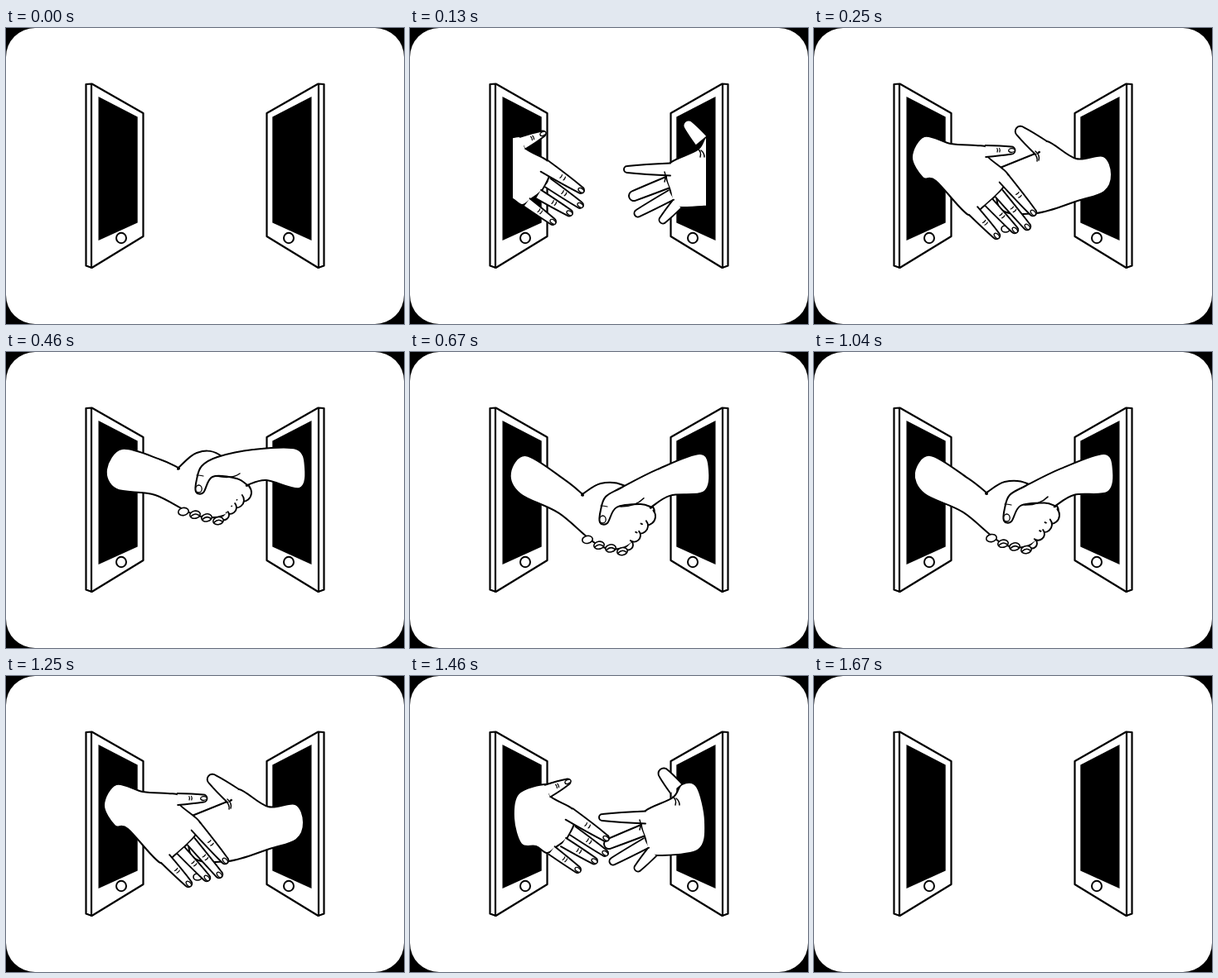
Write an HTML page with a canvas that moves like this. It is 480 px wide and 358 px high and loops after 1790 ms.

```html
<!DOCTYPE html>
<html lang="en">
<head>
<meta charset="utf-8">
<title>Handshake</title>
<style>
html, body { margin: 0; width: 100%; height: 100%; overflow: hidden; background: #000; }
canvas { display: block; width: 480px; height: 358px; }
</style>
</head>
<body>
<canvas id="stage" width="480" height="358"></canvas>
<script>
const ctx = document.getElementById('stage').getContext('2d');
const LOOP = 1790;
const still = (x, y) => [x, y];
const mix = (a, b, t) => a + (b - a) * t;
let warp = still;

function paint(width = 2) {
  ctx.lineWidth = width;
  ctx.fillStyle = '#fff';
  ctx.fill();
  ctx.stroke();
}

// Closed smooth curve through key points; a repeated point makes a corner.
function blob(...flat) {
  const n = flat.length / 2;
  const at = i => {
    const k = (i + n) % n * 2;
    return warp(flat[k], flat[k + 1]);
  };
  ctx.beginPath();
  ctx.moveTo(...at(0));
  for (let i = 0; i < n; i++) {
    const [a, b, c, d] = [at(i - 1), at(i), at(i + 1), at(i + 2)];
    ctx.bezierCurveTo(
      b[0] + (c[0] - a[0]) / 6, b[1] + (c[1] - a[1]) / 6,
      c[0] - (d[0] - b[0]) / 6, c[1] - (d[1] - b[1]) / 6, ...c);
  }
  paint();
}

function arc(x, y, rx, ry, turn = 0, from = 0, to = 7, width = 1.6) {
  ctx.beginPath();
  ctx.ellipse(...warp(x, y), rx, ry, turn, from, to);
  paint(width);
}

function stroke(x0, y0, cx, cy, x1, y1, width = 1.5) {
  ctx.lineWidth = width;
  ctx.beginPath();
  ctx.moveTo(...warp(x0, y0));
  ctx.quadraticCurveTo(...warp(cx, cy), ...warp(x1, y1));
  ctx.stroke();
}

// Tapered finger, open at its base so that it merges with the palm
function finger(x0, y0, x1, y1, r0, r1, nailed) {
  const a = Math.atan2(y1 - y0, x1 - x0), len = Math.hypot(x1 - x0, y1 - y0);
  ctx.save();
  ctx.translate(x0, y0);
  ctx.rotate(a);
  ctx.beginPath();
  ctx.moveTo(0, r0);
  ctx.quadraticCurveTo(len * .6, mix(r0, r1, .4), len, r1);
  ctx.arc(len, 0, r1, Math.PI / 2, -Math.PI / 2, true);
  ctx.quadraticCurveTo(len * .6, -mix(r0, r1, .4), 0, -r0);
  paint(1.9);
  if (nailed) {
    arc(len + .5, 0, 3.8, 2.3, 0, 0, 7, 1.3);
    for (const k of [.45, .54]) stroke(len * k, -3, len * k + 1, -1, len * k, 1.5, 1.2);
  }
  ctx.restore();
}

function polygon(...pts) {
  ctx.beginPath();
  pts.forEach(([x, y]) => ctx.lineTo(x, y));
  ctx.closePath();
}

function mirrored(draw) {
  draw();
  ctx.save();
  ctx.translate(480, 0);
  ctx.scale(-1, 1);
  draw();
  ctx.restore();
}

function phone() {
  polygon([96.5, 68], [103.5, 67.5], [165.5, 103], [165.5, 252], [103.5, 290], [96.5, 287.5]);
  paint(2.2);
  polygon([103, 68], [103, 290]);
  ctx.stroke();
  polygon([111.5, 83], [158.7, 107.5], [158.7, 235.5], [111.5, 257]);
  ctx.fillStyle = '#000';
  ctx.fill();
  arc(139, 254, 6, 6.2, 0, 0, 7, 2);
}

function openRight() {
  blob(346,134, 328,131, 317,147, 284,163, 279,180, 284,197, 288,212, 300,217, 348,210, 356,176);
  finger(321, 136, 306, 118, 9, 6.5);
  finger(284, 171, 232, 171, 7.5, 4);
  finger(280, 187, 240, 203, 7, 6);
  finger(285, 202, 245, 224, 6.5, 4.5);
  finger(292, 213, 275, 232, 7, 4.5);
  stroke(317, 146, 322, 150, 320, 156);
  stroke(321, 148, 325, 151, 325, 156);
  stroke(277, 174, 279, 179, 277, 186);
}

function openLeft() {
  blob(131,142, 165,131, 170,146, 195,160, 200,172, 190,195, 176,207, 165,214, 152,206, 134,203, 125,172);
  finger(166, 139, 190, 128, 8, 3.6, true);
  finger(192, 167, 236, 196, 8, 4, true);
  finger(196, 187, 235, 214, 6, 4, true);
  finger(185, 201, 222, 223.5, 6, 4, true);
  finger(171, 211, 202, 234, 6, 4, true);
}

// Hands drawn back by some pixels are cut off where they enter the screens.
function reach(back) {
  for (const [draw, dx, x] of [[openRight, back, 217], [openLeft, -back, 124]]) {
    ctx.save();
    if (back) {
      ctx.beginPath();
      ctx.roundRect(x, 100, 140, 160, 20);
      ctx.clip();
    }
    ctx.translate(dx, 0);
    draw();
    ctx.restore();
  }
}

function meet() {
  blob(349,155, 316,158, 281,137, 269,151, 269,151, 222,170, 222,170,
    224,218, 268,224, 318,209, 350,198, 359,177);
  finger(274, 145, 249, 125, 10.5, 6.3);
  stroke(267, 149, 273, 154, 271, 160);
  stroke(265, 151, 270, 156, 269, 161);
  arc(231, 243, 5, 4);
  blob(133,131, 165,140, 195,142, 208,144, 210,156, 234,177, 228,193, 203,217, 186,226,
    147,185, 131,181, 118,156);
  finger(207, 149, 238, 148, 7, 4.5, true);
  finger(229, 182, 264, 223, 7, 4.3, true);
  finger(223, 200, 257, 240, 6, 4.3, true);
  finger(211, 211, 242, 244, 6, 4.3, true);
  finger(192, 221, 220, 251, 7, 4.3, true);
}

// The wrists stay near the screens while the clasp swings down.
function clasp(base, swing) {
  warp = (x, y) => {
    const w = Math.max(0, Math.min(1, 1.2 - Math.abs(x - 242) / 95));
    return [x, y + base + swing * w];
  };
  blob(140,117, 186,130, 208,140, 208,140, 230,122, 257,124, 292,160, 289,175, 262,198,
    228,197, 180,173, 133,166, 121,142);
  for (let i = 0; i < 4; i++) {
    const t = i / 3, r = mix(11, 6, t);
    arc(mix(285, 263, t), mix(170, 197, t), r, r, 0, -.7, 2.2, 1.9);
  }
  for (let i = 0; i < 4; i++) {
    const x = 214 + 14 * i, y = 193 + 3.7 * i;
    arc(x, y, 6.3, 4.5, -.2);
    if (i) stroke(x - 5, y + 2, x, y - 3, x + 5, y + 1);
  }
  blob(350,117, 298,118, 255,127, 236,138, 230,154, 229,169, 238,170, 249,151, 278,153,
    291,161, 291,161, 314,155, 354,165, 361,140);
  stroke(254, 150, 272, 154, 282, 147);
  stroke(230, 149, 234, 149, 238, 150, 1.2);
  arc(232.5, 165.5, 3.7, 4.5, 0, 0, 7, 1.3);
  warp = still;
}

const poses = [
  [0, () => {}],
  [130, () => reach(30)],
  [170, () => reach(0)],
  [250, meet],
  [380, () => clasp(4, 33)],
  [460, () => clasp(0, 0)],
  [670, () => clasp(4, 33)],
  [880, () => clasp(4, 1)],
  [1040, () => clasp(4, 31)],
  [1250, meet],
  [1460, () => reach(0)],
  [1540, () => reach(30)],
  [1670, () => {}]
];

function frame() {
  const t = performance.now() % LOOP;
  ctx.fillStyle = '#000';
  ctx.fillRect(0, 0, 480, 358);
  ctx.fillStyle = '#fff';
  ctx.beginPath();
  ctx.roundRect(0, 0, 480, 358, 35);
  ctx.fill();
  ctx.strokeStyle = '#000';
  ctx.lineCap = ctx.lineJoin = 'round';
  mirrored(phone);
  poses.findLast(([start]) => start <= t)[1]();
  requestAnimationFrame(frame);
}
frame();
</script>
</body>
</html>
```
